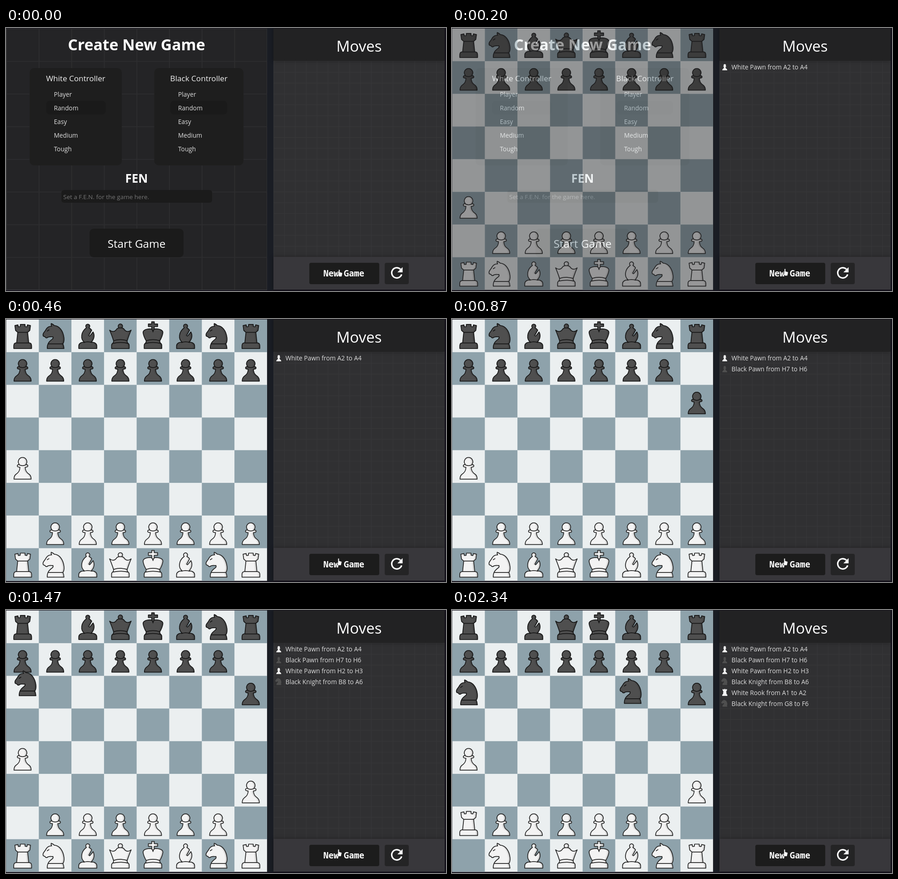
An HTML page that plays this animation: 969 px wide and 578 px high, repeating every 2.41 s.

```html
<!DOCTYPE html>
<html lang="en">
<head>
<meta charset="utf-8">
<title>Chess game</title>
<style>
  html, body { margin: 0; width: 100%; height: 100%; overflow: hidden; background: #16131d; }
  svg { display: block; width: 969px; height: 578px; font-family: "Open Sans", "Noto Sans", sans-serif; }
  text { fill: #fff; white-space: pre; }
  .mid { text-anchor: middle; }
  .bar { filter: drop-shadow(0 0 4px #0005); }
  .item { fill: #dedede; }
</style>
</head>
<body>
<svg id="stage" viewBox="0 0 969 578"></svg>
<script>
const LOOP = 2410, CELL = 71.8, LEFT = 0.5, TOP = 1.1;
const FIRST_MOVE = 107, MOVE_GAP = 398, MOVE_TIME = 300;
const FADE_START = 43, FADE_TIME = 282;

// Piece outlines on a 72-unit cell: [silhouette, inner lines]
const shapes = {
  Pawn: ['M36 15.5a9.5 9.5 0 0 1 7.5 15.5q4.5 1 4.5 3.5q0 3-6 3c0 8 3 12 9 16q4.5 3.5 4.5 11h-39q0-7.5 4.5-11c6-4 9-8 9-16q-6 0-6-3q0-2.5 4.5-3.5a9.5 9.5 0 0 1 7.5-15.5z',
    'M28.5 32Q36 36 43.5 32'],
  Rook: ['M18.5 12.5L25.5 11 26.5 15.5 30.5 15 31 10H41.5L42 15 46 15.5 47 11 54 12.5 52.5 23.5 47.5 28 50 51.5Q56.5 52 56.5 58V64.5H16V58Q16 52 22.5 51.5L25 28 20 23.5Z',
    'M25 28H47.5M22.5 52H50'],
  Knight: ['M28 14Q26 11 27 8Q31 9 34 12.5C45 13 54 24 56 40Q57 49 53.5 54Q55.5 58 56 64.5H18C17.5 53 23 48 30 43Q32 41 31 38C27 39 22 36 17.5 40.5Q14 41 13 38L9 36.5Q7.5 33 9.5 29.5C13 25 14 24 16 20Q20 14 28 14Z',
    'M21 54H53.5M18 25l4-2.5'],
  Bishop: ['M33 17.5a4.6 4.6 0 1 1 6 0Q43 20 45 23L38.5 35q1 2.5 3 .5L48 27C52 34 51 43 44 50Q56.5 51 56.5 59V64.5H15.5V59Q15.5 51 28 50C19 43 20 27 33 17.5Z',
    'M27 51Q36 48 45 51'],
  Queen: ['M33 18a5 5 0 1 1 6 0Q43 18.5 44.5 21Q51 30 60.5 23Q56 33 51.5 47Q51 50 53 52.5Q56 54 56 58V64.5H16V58Q16 54 19 52.5Q21 50 20.5 47Q16 33 11.5 23Q21 30 27.5 21Q29 18.5 33 18Z',
    'M33 18h6M20.5 47Q36 42 51.5 47M19 53Q36 49 53 53'],
  King: ['M33 4h6v5h7.5v6h-7.5v6Q40 20 43 20Q59 21 58.5 29Q57 38 51.5 47Q51 50 53 52.5Q56 54 56 58V64.5H16V58Q16 54 19 52.5Q21 50 20.5 47Q15 38 13.5 29Q13 21 29 20Q32 20 33 21V15H25.5V9H33Z',
    'M33 21Q36 23 36 27Q36 23 39 21M20.5 47Q36 42 51.5 47M19 53Q36 49 53 53']
};
const colors = {
  White: { main: '#f3f3f3', shade: '#dadada', line: '#262626' },
  Black: { main: '#4f4f4f', shade: '#464646', line: '#161616' }
};
const moves = [
  ['White', 'Pawn', 'A2', 'A4'], ['Black', 'Pawn', 'H7', 'H6'],
  ['White', 'Pawn', 'H2', 'H3'], ['Black', 'Knight', 'B8', 'A6'],
  ['White', 'Rook', 'A1', 'A2'], ['Black', 'Knight', 'G8', 'F6']
];

const rect = (x, y, w, h, fill, r = 0, extra = '') =>
  `<rect x="${x}" y="${y}" width="${w}" height="${h}" rx="${r}" fill="${fill}" ${extra}/>`;
const label = (x, y, size, str, extra = 'class="mid"') =>
  `<text x="${x}" y="${y}" font-size="${size}" ${extra}>${str}</text>`;
const grid = (id, x, y, size, width, color) =>
  `<pattern id="${id}" x="${x}" y="${y}" width="${size}" height="${size}" patternUnits="userSpaceOnUse">
    <path d="M0 ${width / 2}H${size}M${width / 2} 0V${size}" stroke="${color}" stroke-width="${width}"/></pattern>`;
const boardRect = fill => rect(LEFT, TOP, CELL * 8, CELL * 8, fill);
const squareXY = name => [
  LEFT + (name.charCodeAt(0) - 65) * CELL,
  TOP + (8 - name[1]) * CELL
];

function pieceDefs() {
  let out = '';
  for (const [kind, [body, lines]] of Object.entries(shapes)) {
    out += `<clipPath id="clip${kind}"><path d="${body}"/></clipPath>`;
    for (const [side, c] of Object.entries(colors))
      out += `<g id="${side}${kind}" transform="translate(1.08 1.1) scale(.97)"><path d="${body}" fill="${c.shade}"/>
        <g clip-path="url(#clip${kind})"><path d="${body}" fill="${c.main}" transform="translate(-4 0)"/></g>
        <path d="${body}${lines}" fill="none" stroke="${c.line}" stroke-width="1.8" stroke-linejoin="round" stroke-linecap="round"/></g>`;
  }
  return out;
}

function board() {
  let squares = boardRect('#ebeff0'), still = '', moving = '';
  const back = ['Rook', 'Knight', 'Bishop', 'Queen', 'King', 'Bishop', 'Knight', 'Rook'];
  const sides = { 8: 'Black', 7: 'Black', 2: 'White', 1: 'White' };
  for (let rank = 8; rank; rank--)
    for (let file = 0; file < 8; file++) {
      const name = 'ABCDEFGH'[file] + rank, [x, y] = squareXY(name);
      if ((rank + file) % 2) squares += rect(x, y, CELL, CELL, '#8ea2ab');
      if (!sides[rank]) continue;
      const kind = rank === 2 || rank === 7 ? 'Pawn' : back[file];
      const piece = `<use href="#${sides[rank]}${kind}" id="at${name}" transform="translate(${x} ${y})"/>`;
      if (moves.some(m => m[2] === name)) moving += piece; else still += piece;
    }
  return squares + still + moving;
}

function controller(side, left, width, textX, chosenWidth) {
  const options = ['Player', 'Random', 'Easy', 'Medium', 'Tough'];
  return rect(left, 88, width, 214, '#1e1e1e', 10) +
    rect(textX - 18, 160, chosenWidth, 30, '#1a1a1a', 8) +
    label(left + width / 2, 117, 17.1, side + ' Controller', 'class="mid" style="fill:#f0f0f0"') +
    options.map((o, i) => label(textX - 1, 151 + i * 30, 13.7, o, 'class="item"')).join('');
}

const form = () => boardRect('#242426') + boardRect('url(#wide)') +
  label(287.5, 49, 33.8, 'Create New Game', 'class="mid" font-weight="700"') +
  controller('White', 52, 203, 106.5, 131) + controller('Black', 326.5, 196.5, 380, 125) +
  label(287.5, 340, 26, 'FEN', 'class="mid" font-weight="700"') +
  rect(122, 356, 332, 28, '#1b1b1b', 6) +
  label(126, 376, 13.5, 'Set a F.E.N. for the game here.', 'style="fill:#757575"') +
  rect(184, 441, 207, 63, '#1b1b1b', 9) + label(287.5, 483, 24.3, 'Start Game');

const sidebar = () => rect(589, 1, 377, 574, '#303032') + rect(589, 72, 377, 431, 'url(#fine)') +
  rect(589, 1, 377, 71, '#222223', 0, 'class="bar"') + rect(589, 503, 377, 72, '#38373b', 0, 'class="bar"') +
  label(777.5, 52, 33, 'Moves') +
  moves.map(([side, kind, from, to], i) => {
    const y = 86 + i * 23.9;
    return `<g id="move${i}"><path d="${shapes[kind][0]}" fill="${colors[side].main}" transform="translate(590.6 ${y - 11}) scale(.28)"/>` +
      label(615.5, y + 5, 13.75, `${side} ${kind} from ${from} to ${to}`, 'class="item"') + '</g>';
  }).join('') +
  rect(668, 516, 154, 47, '#1c1c1c', 4) +
  label(744, 546, 18.8, 'New Game', 'class="mid" font-weight="600" font-family="Noto Sans Mono, monospace"') +
  rect(834, 516, 53, 47, '#242425', 4) +
  `<path d="M868.6 530.2A11.2 11.2 0 1 0 871.3 541.6" fill="none" stroke="#fff" stroke-width="3.2"/>
   <path d="M873.4 525.4V537H862z" fill="#fff"/>
   <path id="hand" d="M4 9V1.8a1.4 1.4 0 0 1 2.8 0V6l4.4 1.2q1.3.4 1.1 2L11.4 13.5 10.5 16H5.5L1 10.5q0-1.8 3 .5z" fill="#fff" stroke="#222" stroke-width=".8"/>`;

const $ = id => document.getElementById(id);
$('stage').innerHTML = `<defs>${grid('wide', LEFT - 0.5, TOP - 0.5, CELL, 1.8, '#2d2d2f')}${grid('fine', 588.8, 72.6, 23.9, 1.2, '#363638')}${pieceDefs()}</defs>` +
  rect(574.8, 0, 14.2, 576, '#1a1d24') + board() + `<g id="form">${form()}</g>` + sidebar();

const clamp = x => Math.min(1, Math.max(0, x));

// CSS "ease": cubic-bezier(.25, .1, .25, 1)
function ease(x) {
  if (x <= 0 || x >= 1) return clamp(x);
  let lo = 0, hi = 1;
  const curve = (s, a, b) => 3 * a * s * (1 - s) ** 2 + 3 * b * s * s * (1 - s) + s ** 3;
  for (let i = 0; i < 20; i++) {
    const s = (lo + hi) / 2;
    if (curve(s, .25, .25) < x) lo = s; else hi = s;
  }
  return curve(lo, .1, 1);
}

function draw() {
  const t = performance.now() % LOOP;
  $('form').setAttribute('opacity', 1 - clamp((t - FADE_START) / FADE_TIME));
  moves.forEach(([, , from, to], i) => {
    const start = FIRST_MOVE + i * MOVE_GAP, p = ease((t - start) / MOVE_TIME);
    const [x0, y0] = squareXY(from), [x1, y1] = squareXY(to);
    $('at' + from).setAttribute('transform', `translate(${x0 + (x1 - x0) * p} ${y0 + (y1 - y0) * p})`);
    $('move' + i).setAttribute('visibility', t >= start ? 'visible' : 'hidden');
  });
  const drift = clamp((t - 140) / 170);
  $('hand').setAttribute('transform', `translate(${728.5 - 1.5 * drift} ${530.5 - 5 * drift})`);
  requestAnimationFrame(draw);
}
draw();
</script>
</body>
</html>
```
